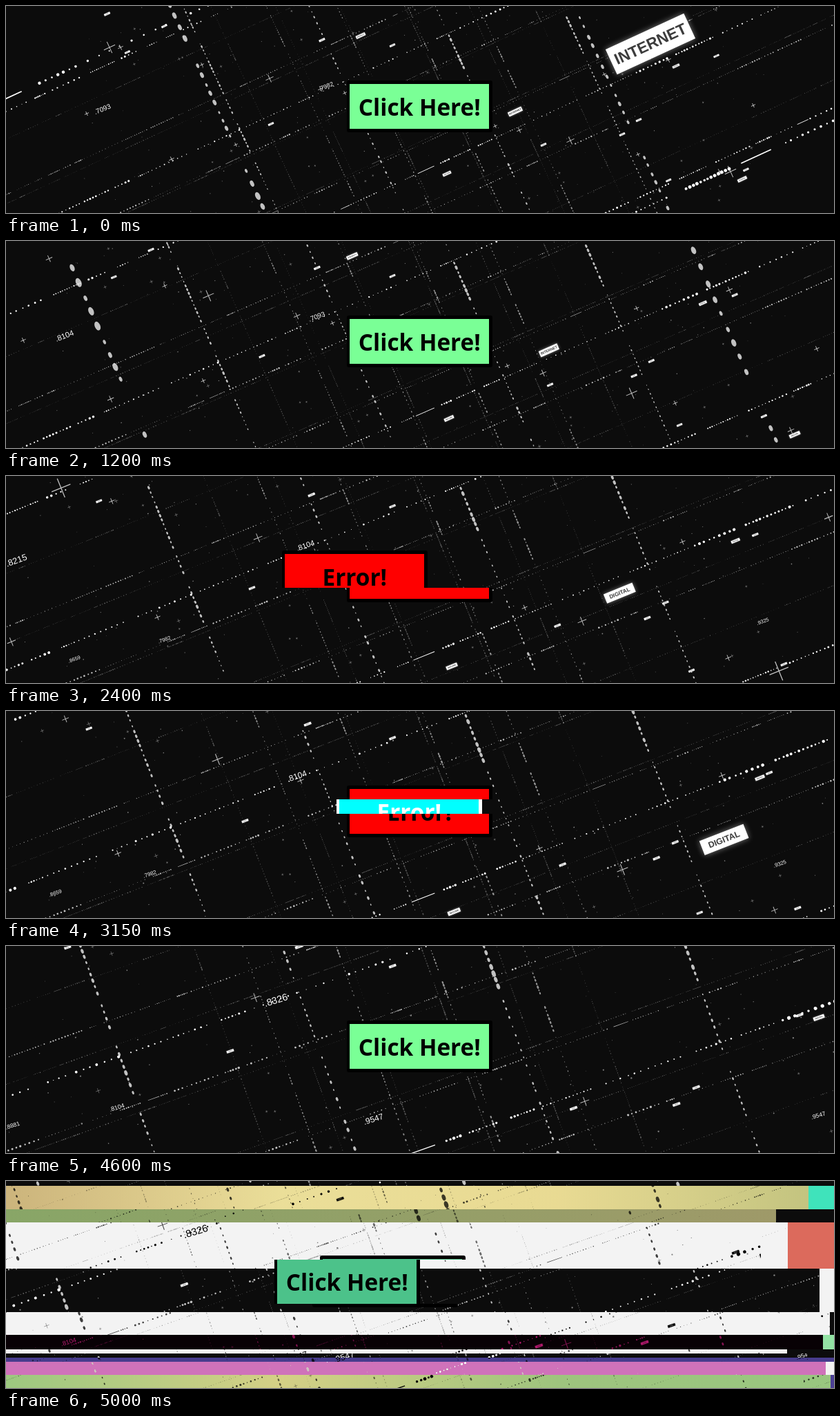
These frames come from a looping animation (1200 by 300 pixels, 5050 ms). An HTML page with a canvas:

```html
<!DOCTYPE html>
<html lang="en">
<head>
<meta charset="utf-8">
<title>Click Here!</title>
<style>
html, body { margin: 0; width: 100%; height: 100%; overflow: hidden; background: #0c0c0c; }
canvas { display: block; width: 1200px; height: 300px; }
</style>
</head>
<body>
<canvas id="stage" width="1200" height="300"></canvas>
<script>
const W = 1200, H = 300, LOOP = 5050, STEP = 50;
const BG = '#0c0c0c', PAPER = '#f3f3f3';
const SANS = 'px "Liberation Sans", Arial, sans-serif';
const ROLL = 1.1 * Math.PI / 180;    // camera roll per second
const TILT = -24.8 * Math.PI / 180;  // grid angle at time zero
const NEAR = 0.25;                   // things closer than this are behind the camera

const layer = () => {
  const c = document.createElement('canvas');
  c.width = W;
  c.height = H;
  return c.getContext('2d');
};
const stage = document.getElementById('stage').getContext('2d');
const scene = layer(), button = layer();

let seed = 7093;
const rnd = () => (seed = (seed * 16807) % 2147483647) / 2147483647;
const between = (a, b) => a + (b - a) * rnd();
const many = (n, make) => Array.from({ length: n }, make);

// All places below are relative to the stage centre at time zero; z is the depth in seconds of flight.

// ---- square grids of dotted lines, one per depth ----

function makeMarks(upright, size) {
  const marks = [];
  for (let s = -690; s < 690; s += size * between(2, upright ? 20 : 13)) {
    if (!upright && rnd() < 0.07) {
      const len = size * between(10, 28);
      marks.push({ s, len, r: size * 0.4 });
      s += len;
      continue;
    }
    const gap = size * (upright ? between(5, 9) : between(1.6, 2.9) ** 2);
    const base = size * (0.55 + 0.8 * rnd() ** 2);
    for (let n = between(3, 14); n > 0; n--) {
      marks.push({ s, r: Math.min(base * between(0.6, 1.4), gap * 0.42) });
      s += gap * between(0.85, 1.15);
    }
  }
  return marks;
}

const lines = [];
function addGrid(z, count, spacing, size, alpha) {
  for (let i = 0; i < count; i++)
    for (const upright of [false, true])
      lines.push({
        z, upright,
        d: (i - (count - 1) / 2) * spacing,
        alpha: upright ? alpha * 0.75 : alpha,
        marks: makeMarks(upright, size)
      });
}
addGrid(26, 6, 85, 0.45, 0.4);
addGrid(17, 4, 93, 0.65, 0.75);
addGrid(11.6, 4, 166, 1, 1);
addGrid(3.3, 2, 532, 2.2, 1);

// ---- single items ----

// Word plates: x, y, z, word, width
const plates = [
  [334, -95, 1.9, 'INTERNET', 125],
  [138, 3, 4.58, 'INTERNET'],
  [371, -63, 13.1, 'DIGITAL'],
  [-86, -107, 8, 'PRIVACY'],
  [467, 101, 8.3, 'DIGITAL'],
  [39, 93, 9.7, 'SECURE'],
  [179, 51, 21, 'DATA'],
  [-216, 21, 21.8, 'DATA'],
  [-40, -93, 22.5, 'DATA'],
  [293, 36, 20.6, 'DATA'],
  ...many(8, () => [between(-560, 560), between(-140, 140), between(17, 25), 'DATA'])
];

// Counters: x, y, z, first tick shown, first code
const TICK = 1.15;
const counters = [
  [-136, -33, 12.6, 0, 0],
  [-460, 0, 11.2, 0, 1],
  [-315, 90, 17.2, 2, 0],
  [-428, 120, 17.7, 2, 7],
  [431, 33, 17.6, 2, 13],
  [-39, 72, 14, 3, 14]
];
const codeAt = i => i < 2 ? [7982, 7093][i] : 7882 + 111 * i;

// Crosses come in pairs mirrored through the centre.
const crosses = [
  [-144, -30, 6.1], [-218, -45, 4.1], [-267, 51, 8.2], [-316, -65, 8], [-450, -90, 2.8],
  [-434, -90, 6.1], [-360, 72, 6.2], [-109, -24, 8.3], [-483, 6, 7.5]
].flatMap(([x, y, z]) => [[x, y, z], [-x, -y, z]]);
const faint = many(36, () => [between(-500, 500), between(-150, 150), between(10, 20)]);
const specks = many(190, () => [between(-500, 500), between(-160, 160), between(11, 30)]);

// ---- scene ----

// The camera flies forward and rolls around the centre.
function place(g, t, z) {
  g.translate(W / 2, H / 2);
  g.rotate(ROLL * t);
  g.scale(z / (z - t), z / (z - t));
}

function each(g, t, items, draw) {
  for (const item of items) {
    const [x, y, z] = item;
    if (z - t < NEAR) continue;
    g.save();
    place(g, t, z);
    g.translate(x, y);
    g.rotate(TILT);
    draw(item, z / (z - t));
    g.restore();
  }
}

function drawLine(g, t, { z, d, upright, alpha, marks }) {
  if (z - t < NEAR) return;
  g.save();
  place(g, t, z);
  g.rotate(TILT);
  g.globalAlpha = alpha;
  g.beginPath();
  for (const { s, r, len } of marks) {
    if (len) {
      g.rect(s, d - r, len, 2 * r);
      continue;
    }
    const x = upright ? d : s, y = upright ? s : d;
    g.moveTo(x + r, y);
    g.ellipse(x, y, r, upright ? r * 1.7 : r, 0, 0, 7);
  }
  g.fill();
  g.restore();
}

function drawCrosses(g, t, items, alpha) {
  g.globalAlpha = alpha;
  each(g, t, items, ([, , z], k) => {
    const arm = 25 / z;
    g.lineWidth = 0.7 / k + arm * 0.04;
    g.beginPath();
    g.moveTo(-arm, 0);
    g.lineTo(arm, 0);
    g.moveTo(0, -arm);
    g.lineTo(0, arm);
    g.stroke();
  });
  g.globalAlpha = 1;
}

function drawCounters(g, t) {
  const tick = Math.floor(t / TICK);
  each(g, t, counters, ([, , z, from, code]) => {
    if (tick < from) return;
    g.rotate(0.04);
    g.font = 112 / z + SANS;
    g.fillText('.' + codeAt(code + tick - from), 0, 0);
  });
}

function drawPlates(g, t) {
  each(g, t, plates, ([, , z, word, w = 5 + 75 / z], k) => {
    const h = w * 0.32;
    g.shadowColor = 'rgba(255,255,255,.45)';
    g.shadowBlur = Math.min(8, w * k * 0.15);
    g.fillStyle = '#fff';
    g.fillRect(-w / 2, -h / 2, w, h);
    g.shadowBlur = 0;
    g.fillStyle = '#3c3c3c';
    const text = t > 1.8 && word === 'INTERNET' ? 'DIGITAL' : word;
    g.font = 'bold ' + w * 0.18 + SANS;
    g.fillText(text, 0, w * 0.01);
  });
}

function drawScene(t) {
  const g = scene;
  g.fillStyle = BG;
  g.fillRect(0, 0, W, H);
  g.fillStyle = g.strokeStyle = '#fff';
  g.textAlign = 'center';
  g.textBaseline = 'middle';
  g.globalAlpha = 0.5;
  each(g, t, specks, ([, , z]) => g.fillRect(0, 0, 14 / z, 14 / z));
  g.globalAlpha = 1;
  for (const line of lines) drawLine(g, t, line);
  drawCrosses(g, t, faint, 0.35);
  drawCrosses(g, t, crosses, 0.75);
  drawCounters(g, t);
  drawPlates(g, t);
}

// ---- button ----

function drawButton(text, fill) {
  const g = button;
  g.clearRect(0, 0, W, H);
  g.fillStyle = '#000';
  g.beginPath();
  g.roundRect(494, 108, 211, 75, 3);
  g.fill();
  g.fillStyle = fill;
  g.fillRect(498, 113, 202, 65);
  g.fillStyle = '#000';
  g.font = 'bold 33.33px "Open Sans", "Noto Sans", sans-serif';
  g.textAlign = 'center';
  g.fillText(text, 599.3, 159);
}

// Copies a horizontal band of a layer, moved sideways.
function band(src, y, h, dx = 0, invert = false) {
  stage.filter = invert ? 'invert(1)' : 'none';
  stage.drawImage(src.canvas, 0, y, W, h, dx, y, W, h);
  stage.filter = 'none';
}

// ---- torn picture ----

// Each tear runs down to the next one; its right end is a gap of another colour.
const tears = [
  { y: 0 },
  { y: 7, gap: 37, end: '#3fe3bb', invert: true, tint: ['#d6bd82', '#f6e9a0', '#f4e59a', '#c9cb84'] },
  { y: 41, gap: 84, end: BG, invert: true, tint: ['#8fae6c', '#a8a06e'] },
  { y: 60, gap: 67, end: '#dc6a5c', invert: true },
  { y: 127, gap: 21, end: PAPER },
  { y: 190, gap: 6, end: BG, invert: true },
  { y: 223, gap: 16, end: '#93e3a4', tint: ['#b0186c'] },
  { y: 244, gap: 68, end: BG, invert: true },
  { y: 250 },
  { y: 256, invert: true, tint: ['#4b3f94'] },
  { y: 262, gap: 12, end: PAPER, tint: ['#cf72ba'], blend: 'lighten' },
  { y: 281, gap: 5, end: '#4b3f94', invert: true, tint: ['#a4d286', '#dfda8c', '#a6ce84', '#a0d086'] }
];

function drawTears() {
  tears.forEach(({ y, gap = 0, end, invert, tint = ['#fff'], blend = 'multiply' }, i) => {
    const h = (i + 1 < tears.length ? tears[i + 1].y : H) - y;
    const dx = -39 - gap;
    band(scene, y, h, dx, invert);
    band(scene, y, h, dx + W, invert);
    const grad = stage.createLinearGradient(0, 0, W, 0);
    tint.forEach((c, n) => grad.addColorStop(n / Math.max(1, tint.length - 1), c));
    stage.globalCompositeOperation = blend;
    stage.fillStyle = grad;
    stage.fillRect(0, y, W, h);
    stage.globalCompositeOperation = 'source-over';
    if (!gap) return;
    stage.fillStyle = end;
    stage.fillRect(W - gap, y, gap, h);
  });
  band(button, 108, 6, -39);
  band(button, 178, 5, -50);
  band(button, 114, 64, -105);
}

function render(ms) {
  const during = (a, b) => ms >= a && ms < b;
  const error = during(2350, 3250), torn = ms >= 5000;
  drawScene(ms / 1000);
  drawButton(error ? 'Error!' : 'Click Here!', error ? '#f00' : torn ? '#4cc28a' : '#7aff96');

  if (torn) return drawTears();
  band(scene, 0, H);
  if (during(2350, 2450)) {
    band(button, 108, 54, -94);
    band(button, 162, 21);
  } else if (during(3100, 3200)) {
    band(button, 108, 20);
    band(button, 128, 21, -15, true);
    band(button, 149, 34);
  } else {
    band(button, 108, 75);
  }
}

const start = performance.now();
let shown = -1;
function tick() {
  const ms = Math.floor(((performance.now() - start) % LOOP) / STEP) * STEP;
  if (ms !== shown) render(shown = ms);
  requestAnimationFrame(tick);
}
tick();
</script>
</body>
</html>
```
